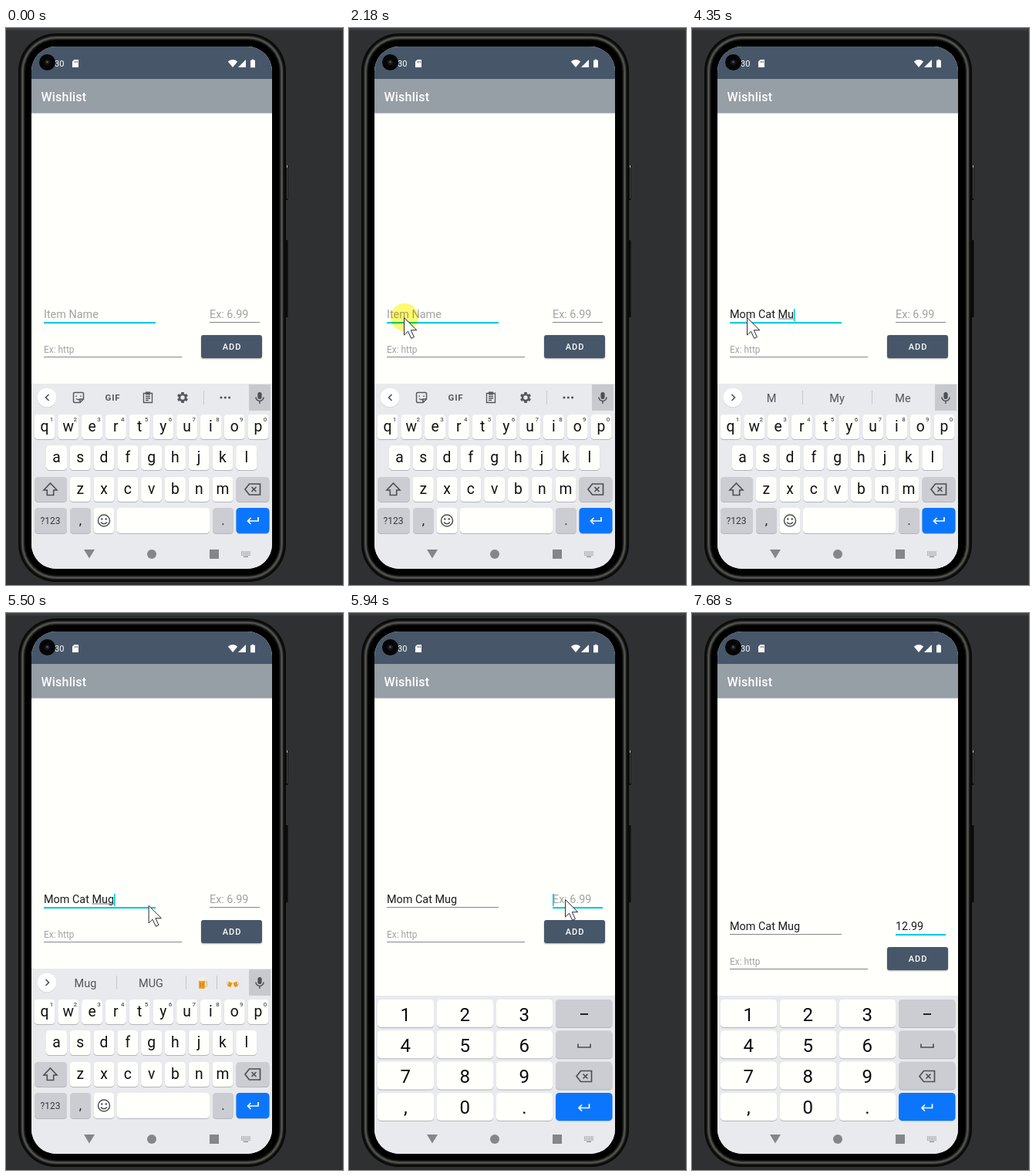
An HTML page with a canvas for the animation above (8000 ms loop, 437 px wide and 722 px high).

```html
<!DOCTYPE html>
<html lang="en">
<head>
<meta charset="utf-8">
<title>Wishlist</title>
<style>
html, body { margin: 0; width: 100%; height: 100%; overflow: hidden; background: #2f3032; }
canvas { display: block; }
</style>
</head>
<body>
<canvas id="stage" width="437" height="722"></canvas>
<script>
const ctx = document.getElementById('stage').getContext('2d');
const LOOP = 8000;
const SLATE = '#475769', CYAN = '#0ccae2', PAPER = '#fffffc', BOARD = '#e8eaed';
const GREY_KEY = '#cccdd2', BLUE = '#0b76fb', ICON = '#4c4f54', TOOL = '#55585c';

// time, text, suggestions (the last entry may name an emoji pair)
const nameSteps = [
  [0, '', null],
  [2660, 'M', null],
  [2890, 'Mo', ['M', 'My', 'Me']],
  [2990, 'Mo', ['Mo', 'Most', 'More']],
  [3060, 'Mom', ['Mom', 'Moms', 'Mom\u2019s']],
  [3290, 'Mom ', ['and', 'is', 'said']],
  [3420, 'Mom C', ['and', 'is', 'said']],
  [3600, 'Mom Ca', ['and', 'is', 'said']],
  [3630, 'Mom Ca', ['C', 'Can', 'Call']],
  [3830, 'Mom Cat', ['Ca', 'Can', 'Car']],
  [3860, 'Mom Cat', ['Cat', 'CAT', '#cat']],
  [3990, 'Mom Cat ', ['Cat', 'CAT', '#cat']],
  [4150, 'Mom Cat M', ['and', 'is', '#cat']],
  [4350, 'Mom Cat Mu', ['M', 'My', 'Me']],
  [4590, 'Mom Cat Mu', ['Mu', 'My', 'Mud']],
  [4860, 'Mom Cat Mug', ['Mu', 'My', 'Mud']],
  [5050, 'Mom Cat Mug', ['Mug', 'MUG', '#beer']]
];
const priceSteps = [[0, ''], [6380, '1'], [6550, '12'], [6620, '12.'], [6910, '12.9'], [7090, '12.99']];
const pointerPath = [
  [280, 295, 665], [400, 224, 560], [560, 109, 440], [700, 49, 388], [800, 46, 373], [940, 71, 375],
  [5380, 71, 375], [5500, 184, 379], [5620, 257, 374], [5740, 280, 371], [7600, 280, 371], [7680, 200, 382]
];
const clicks = [[2180, 2310], [5770, 5880]];

const during = (t, a, b) => t >= a && t < b;
const stepAt = (steps, t) => steps.filter(s => s[0] <= t).pop();

function rect(x, y, w, h, fill) {
  ctx.fillStyle = fill;
  ctx.fillRect(x, y, w, h);
}
function round(x, y, w, h, r, fill) {
  ctx.beginPath();
  ctx.roundRect(x, y, w, h, r);
  ctx.fillStyle = fill;
  ctx.fill();
}
function disc(x, y, r, fill) {
  ctx.beginPath();
  ctx.arc(x, y, r, 0, 7);
  ctx.fillStyle = fill;
  ctx.fill();
}
function text(s, x, y, size, fill, align = 'left', weight = 400, spacing = 0) {
  ctx.font = `${weight} ${size}px Roboto, sans-serif`;
  ctx.letterSpacing = spacing + 'px';
  ctx.textAlign = align;
  ctx.fillStyle = fill;
  ctx.fillText(s, x, y);
  const w = ctx.measureText(s).width;
  ctx.letterSpacing = '0px';
  return w;
}
// Draws an SVG path around (x, y)
function icon(d, x, y, color, width = 0) {
  ctx.save();
  ctx.translate(x, y);
  const p = new Path2D(d);
  if (width) {
    ctx.strokeStyle = color;
    ctx.lineWidth = width;
    ctx.stroke(p);
  } else {
    ctx.fillStyle = color;
    ctx.fill(p, 'evenodd');
  }
  ctx.restore();
}

function drawPhone() {
  rect(0, 0, 437, 722, '#2f3032');
  rect(0, 0, 437, 3, '#3d4042');
  rect(436, 3, 1, 719, '#3a3b3d');
  round(362, 178, 3.5, 45, 1, '#0c0c0c');
  rect(364, 178, 1, 3, '#d0d0d0');
  rect(364, 181, 1, 40, '#454545');
  round(362, 275, 3.5, 100, 1, '#0a0a0a');
  // metal rim: brightest a few pixels in, black towards the glass
  for (let i = 0; i < 9; i++) {
    const v = Math.round(10 + 78 * Math.exp(-(((i - 5) / 1.8) ** 2)));
    round(16 + i, 7 + i, 347 - 2 * i, 711 - 2 * i, 49 - i, `rgb(${v},${v},${v - 2})`);
  }
  round(25, 16, 329, 693, 40, '#000');
}

function drawBars() {
  rect(33, 24, 312, 42, SLATE);
  rect(33, 66, 312, 44.5, '#969ea6');
  text('Wishlist', 45.5, 95, 16, '#fff', 'left', 500, 0.2);
  text('30', 63, 50.3, 11, '#fff');
  disc(53.5, 44.5, 10.5, '#050505');
  disc(53.5, 44.5, 3.6, '#15191e');
  disc(53.5, 44, 1.5, '#46525f');
  icon('M-1.5-5H4V5H-4V-2.5ZM-1.4-3V-1H-.6V-3ZM.4-3V-1H1.2V-3ZM2-3V-1H2.8V-3Z', 90, 46, '#fff');
  icon('M0 5L-6.2-2.6Q0-7.4 6.2-2.6Z', 294, 46, '#fff');
  icon('M5-5V5H-5Z', 306, 46, '#fff');
  icon('M-1.2-5.2H1.2V-4.2H3V5.2H-3V-4.2H-1.2Z', 320, 46, '#fff');
}

function field(x, y, w, value, hint, size, focused) {
  const width = value ? text(value, x, y, size, '#1d1d1d') : (text(hint, x, y, size, '#a2a2a0'), 0);
  if (focused) rect(x, y + 5, w, 2.2, CYAN);
  else rect(x, y + 5, w, 1, '#858585');
  return x + width;
}

function drawForm(t, name, price) {
  const dy = t >= 5970 ? 35 : 0;
  const onPrice = t >= 5850;
  const y = 376 + dy;
  const endName = field(49, y, 145, name, 'Item Name', 14.4, !onPrice);
  const endPrice = field(264, y, 65, price, 'Ex: 6.99', 14.4, onPrice);
  field(49, 421 + dy, 179, '', 'Ex: http', 11.9, false);

  const cut = name.lastIndexOf(' ') + 1;
  if (!onPrice && cut < name.length) {
    ctx.font = '400 14.4px Roboto, sans-serif';
    const start = 49 + ctx.measureText(name.slice(0, cut)).width;
    rect(start, y + 0.5, endName - start, 1, '#777');
  }
  const caret = during(t, 450, 945) || during(t, 1450, 1940) || during(t, 2460, 7580);
  if (caret) rect(onPrice ? endPrice : endName, y - 12, 1.7, 16, CYAN);

  ctx.save();
  ctx.shadowColor = 'rgba(0,0,0,.3)';
  ctx.shadowBlur = 2;
  ctx.shadowOffsetY = 1;
  round(253, 398 + dy, 79, 30, 3, SLATE);
  ctx.restore();
  text('ADD', 293, 417 + dy, 11.1, '#fff', 'center', 500, 0.9);
}

function key(x, y, w, h, fill = PAPER) {
  round(x, y + 1, w, h, 4.5, '#b3b5ba');
  round(x, y, w, h, 4.5, fill);
}
function backspace(x, y) {
  icon('M-10 0L-4.5-7H9.5V7H-4.5ZM-1.5-3L4.5 3M4.5-3L-1.5 3', x, y, ICON, 1.7);
}
function enter(x, y) {
  icon('M7-4V1H-6M-2.5-3L-6.5 1L-2.5 5', x, y, '#fff', 1.7);
}

function mug(x, y, tilt) {
  ctx.save();
  ctx.translate(x, y);
  ctx.rotate(tilt);
  icon('M3-1H6V5H3', 0, 0, '#d3bd9c', 1.2);
  round(-4.5, -4, 8, 12, 1.5, '#eda026');
  rect(-2.6, 0, 1, 6, '#cf7d12');
  rect(0.4, 0, 1, 6, '#cf7d12');
  round(-5.2, -7, 9.4, 5, 2.4, '#f8eedb');
  ctx.restore();
}
function cat(x, y) {
  icon('M-6 0L-6-7L-2-4H2L6-7V0Z', x, y, '#efa52d');
  disc(x, y + 1, 6.3, '#f2b13c');
  disc(x - 2.5, y, 1, '#444');
  disc(x + 2.5, y, 1, '#444');
  disc(x, y + 3, 1, '#d8715c');
}
function emojiPair(kind) {
  if (kind === '#cat') {
    cat(255, 480);
    cat(294, 480);
    return;
  }
  mug(254.5, 479, 0);
  for (const side of [-1, 1]) {
    ctx.save();
    ctx.translate(294, 479);
    ctx.scale(0.62 * side, 0.62);
    mug(5.5, 1, -0.35);
    ctx.restore();
  }
}

function drawTools() {
  icon('M2.5-4L-1.5 0L2.5 4', 53, 479, ICON, 1.6);
  icon('M-5-6.5H5Q6.5-6.5 6.5-5V2L2 6.5H-5Q-6.5 6.5-6.5 5V-5Q-6.5-6.5-5-6.5M6.5 2H2V6.5M-3-2.5V-1M3-2.5V-1M-3 1.5Q0 4 2.5 1.5', 94, 479, TOOL, 1.5);
  text('GIF', 138.5, 483, 11.5, TOOL, 'center', 700, 0.8);
  icon('M-5.5-5.5H5.5V6.5H-5.5ZM-3-1.5H3M-3 1H3M-3 3.5H1', 184, 479, TOOL, 1.4);
  rect(181, 471.5, 6, 4, TOOL);
  for (let i = 0; i < 6; i++) {
    ctx.save();
    ctx.translate(229, 479);
    ctx.rotate(i * Math.PI / 3);
    rect(-1.8, -7, 3.6, 4, TOOL);
    ctx.restore();
  }
  disc(229, 479, 5.3, TOOL);
  disc(229, 479, 2.7, BOARD);
  rect(256, 470, 1, 18, '#c8cacd');
  for (const x of [279, 284.3, 289.6]) disc(x, 479, 1.6, TOOL);
}

function drawStrip(words) {
  disc(53, 480, 12.3, '#d0d2d5');
  disc(53, 479, 12.3, '#fff');
  rect(315, 462, 28, 34, '#c8c9cd');
  round(326.4, 472, 5.2, 9, 2.6, ICON);
  icon('M-5-.5A5 5 0 0 0 5-.5M0 4.5V8', 329, 479, ICON, 1.5);
  if (!words) return drawTools();
  icon('M-1.5-4L2.5 0L-1.5 4', 53, 479, ICON, 1.6);
  const [left, middle, right] = words;
  rect(143, 470, 1, 18, '#c4c6ca');
  rect(233, 470, 1, 18, '#c4c6ca');
  text(left, 103, 485, 14.5, '#53565a', 'center');
  text(middle, 188, 485, 14.5, '#53565a', 'center');
  if (right[0] === '#') {
    rect(273, 470, 1, 18, '#c4c6ca');
    emojiPair(right);
  } else text(right, 273.5, 485, 14.5, '#53565a', 'center');
}

function drawLetters(words, caps) {
  rect(33, 461, 312, 240, BOARD);
  drawStrip(words);
  const rows = [['qwertyuiop', 50, 501], ['asdfghjkl', 65.5, 541], ['zxcvbnm', 96.3, 582]];
  for (const [letters, x0, y] of rows) {
    [...letters].forEach((c, i) => {
      const x = x0 + i * 30.78;
      key(x - 13.5, y, 27, 32);
      text(caps ? c.toUpperCase() : c, x, y + 22, 19.3, '#111', 'center');
      if (y === 501) text((i + 1) % 10, x + 9, 510, 8, TOOL, 'center', 500);
    });
  }
  key(37, 582, 42, 32, GREY_KEY);
  const shift = 'M0-8L8.5 1H4.2V7.5H-4.2V1H-8.5Z';
  icon(shift, 57.5, 598, ICON, 1.6);
  if (caps) icon(shift, 57.5, 598, ICON);
  key(298.5, 582, 43, 32, GREY_KEY);
  backspace(320, 598);
  key(37, 622, 42, 33, GREY_KEY);
  text('?123', 57.5, 643, 12, '#33363a', 'center');
  key(83, 622, 27, 33, GREY_KEY);
  text(',', 96.5, 644, 17, '#222', 'center');
  key(113.5, 622, 27, 33);
  icon('M7.5 0A7.5 7.5 0 1 1-7.5 0A7.5 7.5 0 1 1 7.5 0M-4 2Q0 6.5 4 2', 127, 638.5, ICON, 1.5);
  disc(124.3, 636.5, 1.2, ICON);
  disc(129.7, 636.5, 1.2, ICON);
  key(144, 622, 120, 33);
  key(268, 622, 27, 33, GREY_KEY);
  text('.', 281.5, 644, 17, '#222', 'center');
  key(298.5, 622, 43, 33, BLUE);
  enter(320, 638);
}

function drawDigits() {
  rect(33, 496, 312, 205, BOARD);
  ['123', '456', '789', ',0.'].forEach((row, r) => {
    const y = 501 + r * 40.3;
    [...row].forEach((c, i) => {
      key(37 + i * 77, y, 73, 36);
      text(c, 73.3 + i * 77, Math.floor(y + 28), 24, '#0a0a0a', 'center');
    });
    key(268, y, 73.5, 36, r === 3 ? BLUE : GREY_KEY);
  });
  rect(300, 519, 10, 2, '#222');
  icon('M-8-2V2.5H8V-2', 305, 560.5, ICON, 1.7);
  backspace(305, 600.5);
  enter(304.5, 640.5);
}

function drawNav() {
  const c = '#858688';
  icon('M-7-5.5H7L0 6Z', 108, 681.5, c);
  disc(189, 682, 6, c);
  rect(264, 676, 12, 12, c);
  for (let r = 0; r < 3; r++)
    for (let i = 0; i < 6; i++) rect(305 + i * 2.1, 678.5 + r * 2.1, 1.2, 1.2, c);
  rect(308, 684.8, 6, 1.2, c);
}

function drawPointer(t) {
  if (!during(t, 280, 7680)) return;
  const i = pointerPath.findIndex(p => p[0] > t);
  const [t0, x0, y0] = pointerPath[i - 1], [t1, x1, y1] = pointerPath[i];
  const k = (t - t0) / (t1 - t0);
  const x = x0 + (x1 - x0) * k, y = y0 + (y1 - y0) * k;
  if (clicks.some(c => during(t, c[0], c[1]))) {
    ctx.globalCompositeOperation = 'multiply';
    disc(x + 1, y, 18, '#fdf973');
    ctx.globalCompositeOperation = 'source-over';
  }
  const arrow = 'M.5.5V23L5.5 18.2L9.7 27.3L13.4 25.6L9.3 16.7H16.8Z';
  icon(arrow, x, y, '#fff');
  icon(arrow, x, y, '#2c2c32', 1);
}

function draw() {
  const t = performance.now() % LOOP;
  const [, name, words] = stepAt(nameSteps, t);
  const price = stepAt(priceSteps, t)[1];
  drawPhone();
  ctx.save();
  ctx.beginPath();
  ctx.roundRect(33, 24, 312, 677, 32);
  ctx.clip();
  rect(33, 24, 312, 677, PAPER);
  drawBars();
  drawForm(t, name, price);
  if (t < 5880) drawLetters(words, during(t, 3390, 3420));
  else drawDigits();
  drawNav();
  ctx.restore();
  drawPointer(t);
  requestAnimationFrame(draw);
}
draw();
</script>
</body>
</html>
```
